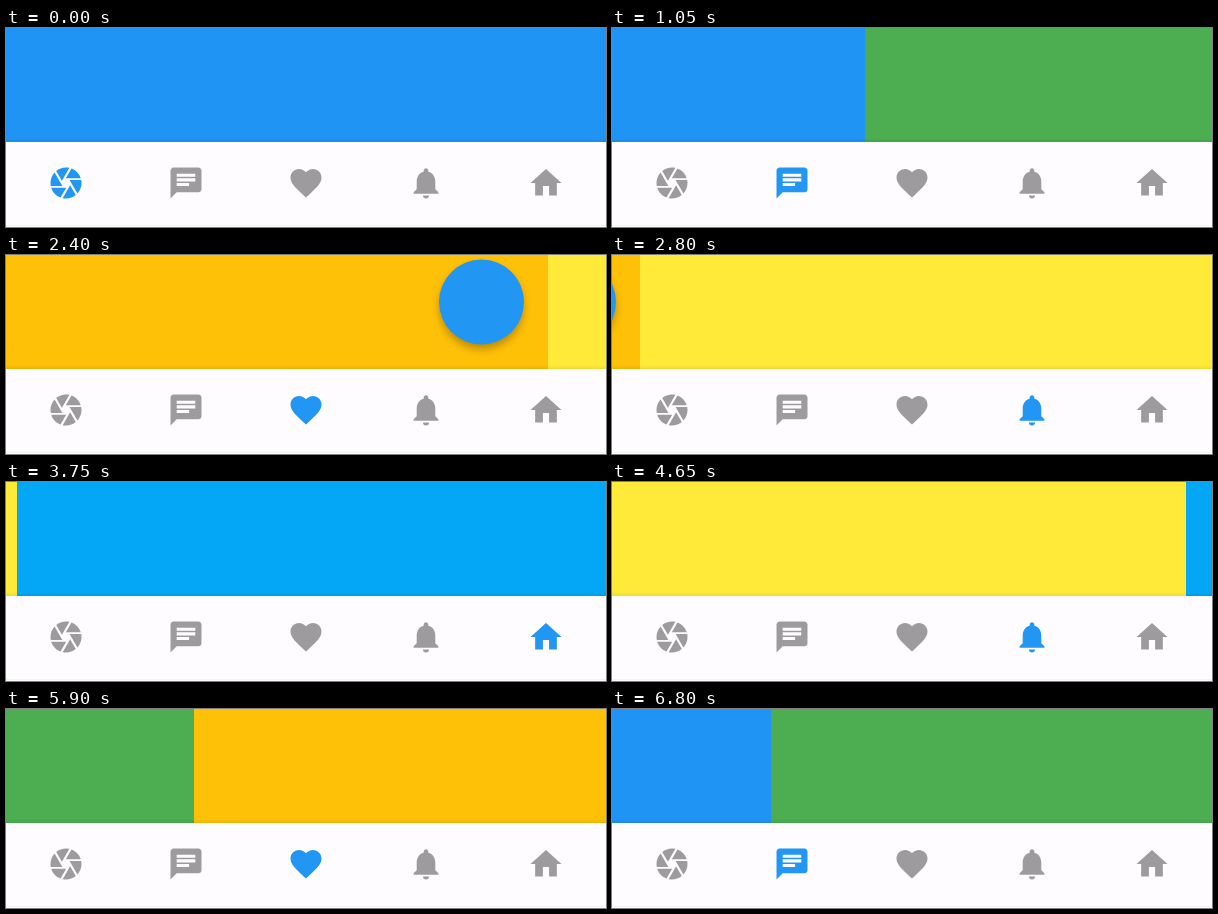
An HTML page that plays this animation: 600x199 px, repeating every 6850 ms.

```html
<!DOCTYPE html>
<html lang="en">
<head>
<meta charset="utf-8">
<title>Swipeable pages with bottom navigation</title>
<style>
  html, body { margin: 0; width: 100%; height: 100%; overflow: hidden; }
  svg { display: block; width: 100vw; height: 100vh; }
</style>
</head>
<body>
<svg id="stage" viewBox="0 0 600 199" preserveAspectRatio="none">
  <defs>
    <linearGradient id="shade" x1="0" y1="0" x2="0" y2="1">
      <stop offset="0" stop-color="#000" stop-opacity="0"/>
      <stop offset="1" stop-color="#000" stop-opacity=".07"/>
    </linearGradient>
    <filter id="blur" x="-30%" y="-30%" width="160%" height="160%">
      <feGaussianBlur stdDeviation="4"/>
    </filter>
  </defs>
  <g id="pages"></g>
  <rect y="110" width="600" height="4" fill="url(#shade)"/>
  <rect y="114" width="600" height="85" fill="#fefcff"/>
  <rect y="197" width="600" height="1" fill="#f4f2f5"/>
  <g id="icons"></g>
</svg>
<script>
const LOOP = 6850, STEP = 50, WIDTH = 600;
const ACTIVE = '#2196f3', IDLE = '#9e9b9e';

const tabs = [
  { color: '#2094f4', icon: 'M9.4 10.5l4.77-8.26C13.47 2.09 12.75 2 12 2c-2.4 0-4.6.85-6.32 2.25l3.66 6.35.06-.1zM21.54 9c-.92-2.92-3.15-5.26-6-6.34L11.88 9h9.66zm.26 1h-7.49l.29.5 4.76 8.25C21 16.97 22 14.61 22 12c0-.69-.07-1.35-.2-2zM8.54 12l-3.9-6.75C3.01 7.03 2 9.39 2 12c0 .69.07 1.35.2 2h7.49l-1.15-2zm-6.08 3c.92 2.92 3.15 5.26 6 6.34L12.12 15H2.46zm11.27 0l-3.9 6.76c.7.15 1.42.24 2.17.24 2.4 0 4.6-.85 6.32-2.25l-3.66-6.35-.93 1.6z' },
  { color: '#4cae50', icon: 'M20 2H4c-1.1 0-1.99.9-1.99 2L2 22l4-4h14c1.1 0 2-.9 2-2V4c0-1.1-.9-2-2-2zM6 9h12v2H6V9zm8 5H6v-2h8v2zm4-6H6V6h12v2z' },
  { color: '#ffc008', icon: 'M12 21.35l-1.45-1.32C5.4 15.36 2 12.28 2 8.5 2 5.42 4.42 3 7.5 3c1.74 0 3.41.81 4.5 2.09C13.09 3.81 14.76 3 16.5 3 19.58 3 22 5.42 22 8.5c0 3.78-3.4 6.86-8.55 11.54L12 21.35z', button: true },
  { color: '#ffea3a', icon: 'M12 22c1.1 0 2-.9 2-2h-4c0 1.1.89 2 2 2zm6-6v-5c0-3.07-1.64-5.64-4.5-6.32V4c0-.83-.67-1.5-1.5-1.5s-1.5.67-1.5 1.5v.68C7.63 5.36 6 7.92 6 11v5l-2 2v1h16v-1l-2-2z' },
  { color: '#03a7f5', icon: 'M10 20v-6h4v6h5v-8h3L12 3 2 12h3v8z' }
];

// Each swipe: start time in ms, direction, spring rate per second
const swipes = [
  [870, 1, 10.8], [1661, 1, 10.8], [2351, 1, 10.8], [3199, 1, 10.8],
  [4080, -1, 8.6], [5027, -1, 10.8], [5795, -1, 10.8], [6707, -1, 10.8]
];

function add(parent, tag, attrs) {
  const node = document.createElementNS('http://www.w3.org/2000/svg', tag);
  for (const key in attrs) node.setAttribute(key, attrs[key]);
  return parent.appendChild(node);
}

const pages = document.getElementById('pages');
const iconRow = document.getElementById('icons');

const icons = tabs.map(({ color, icon, button }, i) => {
  const page = add(pages, 'g', { transform: `translate(${i * WIDTH} 0)` });
  add(page, 'rect', { width: WIDTH, height: 114, fill: color });
  if (button) {
    add(page, 'circle', { cx: 533.5, cy: 52, r: 42, opacity: .28, filter: 'url(#blur)' });
    add(page, 'circle', { cx: 533.5, cy: 47, r: 42.5, fill: ACTIVE });
  }
  return add(iconRow, 'path', {
    d: icon,
    transform: `translate(${60 + i * 120} 155) scale(1.55) translate(-12 -12)`
  });
});

// Critically damped spring from 0 to 1
function spring(ms, rate) {
  const x = Math.max(0, ms) * rate / 1000;
  return 1 - (1 + x) * Math.exp(-x);
}

function render(time) {
  const position = swipes.reduce(
    (sum, [start, dir, rate]) => sum + dir * spring(time - start, rate), 0);
  pages.setAttribute('transform', `translate(${-Math.round(position * WIDTH)} 0)`);
  const selected = Math.round(position);
  icons.forEach((icon, i) => icon.setAttribute('fill', i === selected ? ACTIVE : IDLE));
}

const begin = performance.now();
function tick() {
  const time = (performance.now() - begin) % LOOP;
  render(Math.floor(time / STEP) * STEP);
  requestAnimationFrame(tick);
}
tick();
</script>
</body>
</html>
```
